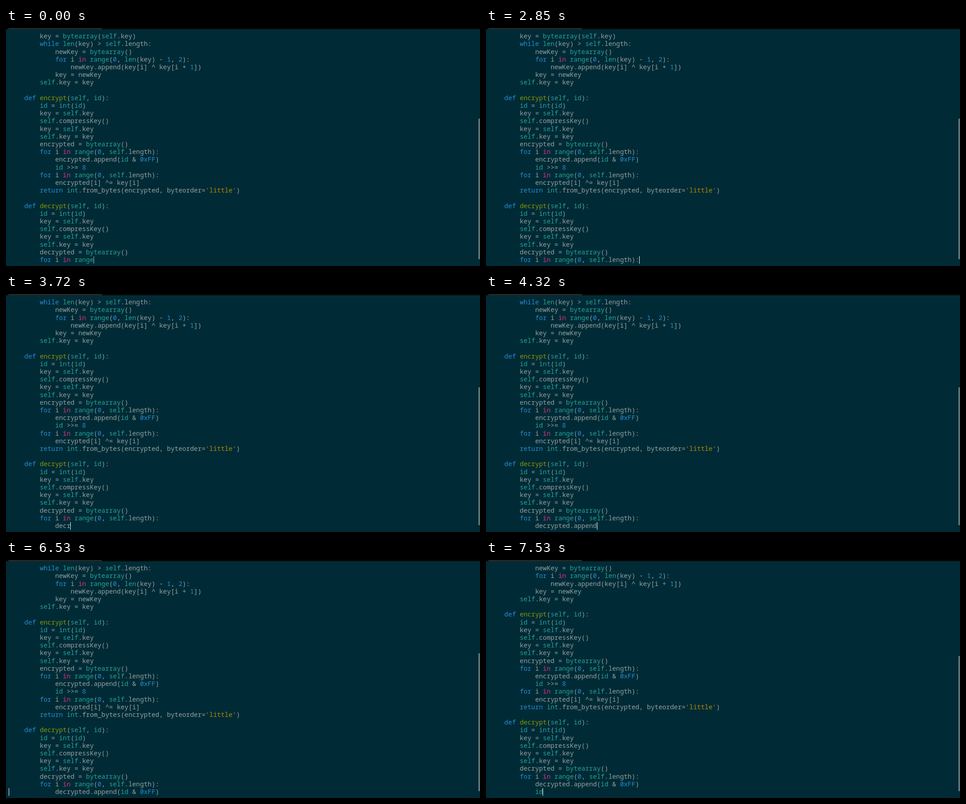
An HTML page for the animation above (8 s loop, 1055 by 531 pixels).

```html
<!DOCTYPE html>
<html lang="en">
<head>
<meta charset="utf-8">
<title>Typing code</title>
<style>
  html, body { margin: 0; width: 100%; height: 100%; overflow: hidden; background: #002b36; }
  #stage { position: relative; width: 1055px; height: 531px; overflow: hidden; background: #002b36; }
  #stage > div { position: absolute; }
  #strip { left: 0; top: 0; width: 1055px; height: 3px; background: #070808; }
  #tab { left: 5px; top: 0; width: 209px; height: 3px; background: #262828;
    clip-path: polygon(1px 0, 208px 0, 100% 100%, 0 100%); }
  .row { left: 6.5px; height: 17px; line-height: 17px; white-space: pre; color: #93a1a1;
    font-family: "Noto Sans Mono", "DejaVu Sans Mono", monospace; font-size: 14.317px;
    font-variant-ligatures: none; }
  .word { color: #268bd2; }
  .call { color: #2aa198; }
  .in { color: #d33682; }
  .name { color: #859900; }
  .str { color: #b58900; }
  #caret { top: 509px; width: 1px; height: 17px; }
  #thumb { left: 1052px; width: 2px; border-radius: 1px; background: #93a1a1; }
</style>
</head>
<body>
<div id="stage">
  <div id="strip"></div>
  <div id="tab"></div>
  <div id="caret"></div>
  <div id="thumb"></div>
</div>
<script>
const LOOP = 8000, ROWS = 30, PITCH = 8.59, LEFT = 6.5, LINE = 17.2;

const code = `        key = bytearray(self.key)
        while len(key) > self.length:
            newKey = bytearray()
            for i in range(0, len(key) - 1, 2):
                newKey.append(key[i] ^ key[i + 1])
            key = newKey
        self.key = key

    def encrypt(self, id):
        id = int(id)
        key = self.key
        self.compressKey()
        key = self.key
        self.key = key
        encrypted = bytearray()
        for i in range(0, self.length):
            encrypted.append(id & 0xFF)
            id >>= 8
        for i in range(0, self.length):
            encrypted[i] ^= key[i]
        return int.from_bytes(encrypted, byteorder='little')

    def decrypt(self, id):
        id = int(id)
        key = self.key
        self.compressKey()
        key = self.key
        self.key = key
        decrypted = bytearray()
        for i in range`;
const indent = ' '.repeat(12);
const typed = `(0, self.length):\n${indent}decrypted.append(id & 0xFF)\n${indent}id`;

// Bursts of typing: first step, last step, number of steps, characters typed by then
const bursts = [
  [380, 380, 1, 1], [710, 710, 1, 2], [1320, 1380, 2, 4], [1650, 1850, 4, 8],
  [2450, 2850, 7, 17], [2920, 3250, 6, 25], [3320, 3720, 7, 34], [3790, 4120, 6, 42],
  [4190, 4390, 4, 47], [4660, 4720, 2, 49], [5320, 5460, 3, 52], [5720, 5930, 4, 56],
  [6530, 6530, 1, 58], [6590, 7200, 10, 70], [7470, 7530, 2, 72]
];
const steps = [];
let before = 0;
for (const [start, end, n, total] of bursts) {
  for (let k = 1; k <= n; k++) {
    const at = n > 1 ? start + (end - start) * (k - 1) / (n - 1) : start;
    steps.push({ at: Math.round(at / 10) * 10, count: before + Math.ceil((total - before) * k / n) });
  }
  before = total;
}

const stage = document.getElementById('stage');
const caret = document.getElementById('caret');
const thumb = document.getElementById('thumb');
const rows = Array.from({ length: ROWS }, (_, i) => {
  const row = document.createElement('div');
  row.className = 'row';
  row.style.top = Math.round(9.2 + i * LINE) + 'px';
  return stage.insertBefore(row, caret);
});

const token = /('[^']*'?)|\b(def|for|while|return|0x[0-9A-F]*|\d+)\b|\b(in)\b|\b(self|id|int|len|range|bytearray)\b|((?<=def )\w+)/g;
const kinds = ['str', 'word', 'in', 'call', 'name'];

function paint(row, text) {
  if (row.textContent === text && row.childNodes.length) return;
  row.textContent = '';
  let end = 0;
  for (const m of text.matchAll(token)) {
    row.append(text.slice(end, m.index));
    const span = document.createElement('span');
    span.className = kinds[m.slice(1).findIndex(g => g !== undefined)];
    span.textContent = m[0];
    row.append(span);
    end = m.index + m[0].length;
  }
  row.append(text.slice(end));
}

let shown = -1;
function show(count) {
  if (count === shown) return;
  shown = count;
  const lines = (code + typed.slice(0, count)).split('\n');
  const col = lines[lines.length - 1].length;
  // The view scrolls one step after the line break
  if (col === 0) lines.pop();
  const top = lines.length - ROWS;
  rows.forEach((row, i) => paint(row, lines[top + i]));
  caret.style.left = Math.floor(LEFT + col * PITCH) + 'px';
  caret.style.background = count ? '#fff' : '#a3b0b2';
  thumb.style.top = 202 + 6 * top + 'px';
  thumb.style.height = 314 - 6 * top + 'px';
}

function tick() {
  const t = performance.now() % LOOP;
  let count = 0;
  for (const s of steps) if (s.at <= t) count = s.count;
  show(count);
  requestAnimationFrame(tick);
}
tick();
</script>
</body>
</html>
```
